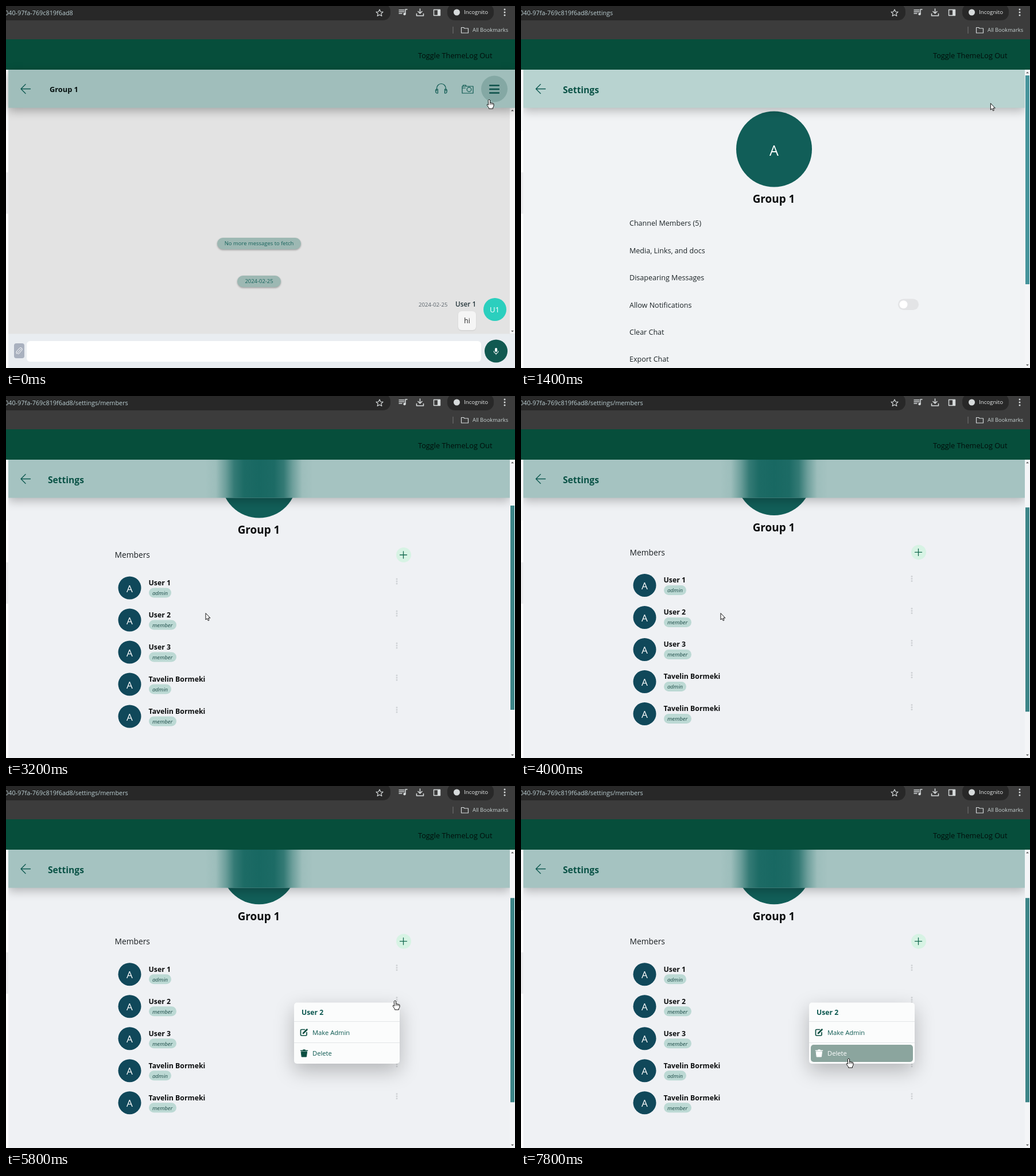
These frames come from a looping animation (887 px wide and 631 px high, 8 s). An HTML page with a canvas:

```html
<!DOCTYPE html>
<html lang="en">
<head>
<meta charset="utf-8">
<title>Group chat settings</title>
<style>
html, body { margin: 0; width: 100%; height: 100%; overflow: hidden; background: #e3e3e3; }
canvas { display: block; }
</style>
</head>
<body>
<canvas id="stage" width="887" height="631"></canvas>
<script>
const W = 887, H = 631, LOOP = 8000, STEP = 200;
const main = document.getElementById('stage').getContext('2d');
const layerCanvas = Object.assign(document.createElement('canvas'), { width: W, height: H });
const layer = layerCanvas.getContext('2d');
let g = main;

const DARK = '#0c5850';
const MENU = ['Channel Members (5)', 'Media, Links, and docs', 'Disapearing Messages',
  'Allow Notifications', 'Clear Chat', 'Export Chat'];
const MEMBERS = [['User 1', 'admin'], ['User 2', 'member'], ['User 3', 'member'],
  ['Tavelin Bormeki', 'admin'], ['Tavelin Bormeki', 'member']];

// Tracks: [time, ...values]
const POINTER = [[0, 842, 163], [600, 860, 143], [800, 861, 142], [1000, 861, 142],
  [1600, 797, 184], [1800, 797, 184], [2000, 404, 360], [2200, 404, 360], [2400, 362, 377],
  [2600, 348, 379], [4600, 348, 379], [5400, 678, 374], [5800, 678, 374], [6400, 590, 422],
  [7000, 578, 430], [7800, 571, 475]];
const SCROLL = [[2800, 0], [3000, 78], [3200, 103], [4000, 107.6], [4400, 109.3]];

function track(keys, t) {
  if (t <= keys[0][0]) return keys[0].slice(1);
  const i = keys.findIndex(k => k[0] > t);
  if (i < 0) return keys[keys.length - 1].slice(1);
  const a = keys[i - 1], b = keys[i], k = (t - a[0]) / (b[0] - a[0]);
  return a.slice(1).map((v, n) => v + (b[n + 1] - v) * k);
}

function rect(x, y, w, h, fill, r = 0) {
  g.fillStyle = fill;
  g.beginPath();
  g.roundRect(x, y, w, h, r);
  g.fill();
}

function disc(x, y, r, fill) {
  g.fillStyle = fill;
  g.beginPath();
  g.arc(x, y, r, 0, 7);
  g.fill();
}

function path(d, x, y, stroke, width = 1.3, fill) {
  const p = new Path2D(d);
  g.save();
  g.translate(x, y);
  g.lineJoin = g.lineCap = 'round';
  if (fill) { g.fillStyle = fill; g.fill(p); }
  if (stroke) { g.strokeStyle = stroke; g.lineWidth = width; g.stroke(p); }
  g.restore();
}

// y is the middle of the capitals
function text(s, x, y, size, color, style = '', align = 'left') {
  g.font = `${style} ${size}px "Open Sans", "Noto Sans", sans-serif`;
  g.textAlign = align;
  g.fillStyle = color;
  g.fillText(s, x, y + size * 0.357);
}

function shadowed(blur, dy, alpha, draw) {
  g.save();
  g.shadowColor = `rgba(0,0,0,${alpha})`;
  g.shadowBlur = blur;
  g.shadowOffsetY = dy;
  draw();
  g.restore();
}

function clipped(x, y, w, h, draw) {
  g.save();
  g.beginPath();
  g.rect(x, y, w, h);
  g.clip();
  draw();
  g.restore();
}

function browser(t) {
  rect(0, 0, W, 58, '#3c3c3c');
  rect(-20, -4, 690, 29, '#282828', 13);
  const tail = t < 800 ? '' : t < 3000 ? '/settings' : '/settings/members';
  text('040-97fa-769c819f6ad8' + tail, -2, 12, 10.85, '#bccfd3');
  const ink = '#d6dadb';
  path('M0-6 1.8-2 6-1.6 2.8 1.2 3.8 5.4 0 3.2-3.8 5.4-2.8 1.2-6-1.6-1.8-2Z', 651, 12, ink, 1.2);
  path('M-7-4H2M-7-1H2M-7 2H-2M4 3V-5H7', 692, 11, ink, 1.5);
  disc(694.5, 14, 2.2, ink);
  path('M0-6V2M-3.5-1.5 0 2 3.5-1.5M-6 2.5V6H6V2.5', 721.5, 11, ink, 1.6);
  path('M-5.5-5H5.5V5H-5.5Z', 751, 11.5, ink, 1.4);
  rect(752, 6.5, 5, 10, ink);
  rect(769, -4, 81, 29, '#282828', 13);
  disc(785.5, 11, 5.5, ink);
  text('Incognito', 798, 11, 9.7, '#e8eaea');
  [6, 11, 16].forEach(y => disc(869, y, 1.5, ink));
  rect(778.5, 36, 1, 12, '#777');
  path('M-6-4.5H-2L-.5-3H6V5H-6Z', 799.5, 42, ink, 1.2);
  text('All Bookmarks', 813, 42, 9.3, '#c9d3d3');
  rect(0, 58, W, 53, '#064e3b');
  text('Toggle ThemeLog Out', 718, 86, 12.75, '#020d0a');
}

function sideStrip() {
  rect(0, 111, 4, H - 111, '#fdfdfd');
  rect(0, 111, 4, 106, '#f6f7f8');
  rect(0, 290, 4, 72, '#ececee');
}

function scrollArrows(top, bottom) {
  path('M-2.5 1.3 0-1.3 2.5 1.3Z', 882.5, top, null, 0, '#555');
  path('M-2.5-1.3 0 1.3 2.5-1.3Z', 882.5, bottom, null, 0, '#555');
}

function backArrow() {
  path('M8.5 0H-8M0-8-8 0 0 8', 34, 144.5, DARK, 1.3);
}

function pill(s, x, y, w) {
  shadowed(3, 1.5, 0.3, () => rect(x, y, w, 20, '#9db8b3', 10));
  text(s, x + w / 2, y + 10, 9.45, '#17635c', '', 'center');
}

function chatPage(t) {
  rect(4, 111, 883, 520, '#e3e3e3');
  rect(878, 178, 9, 393, '#f8f8f8');
  scrollArrows(182, 567);
  shadowed(16, 5, 0.28, () => rect(4, 111, 883, 66.5, '#a0bebb'));
  backArrow();
  text('Group 1', 76, 145, 12.8, '#06100f', 'bold');
  path('M-8 4V0a8 8.5 0 0 1 16 0V4M-8 1q-2 0-2 3t2 4h2V1ZM8 1q2 0 2 3t-2 4h-2V1Z', 758.5, 144, DARK, 1.2);
  path('M-9.5-5H9.5V7H-9.5ZM-8-5V-7H-3V-5M-9.5-2H-4', 804.5, 145, DARK, 1.2);
  g.beginPath();
  g.arc(807, 145.5, 3.8, 0, 7);
  g.strokeStyle = DARK;
  g.lineWidth = 1.2;
  g.stroke();
  if (t < 800) disc(851, 144.5, 23, '#84a8a4');
  [138.5, 145, 151.5].forEach(y => rect(842, y - 1.2, 18, 2.4, '#0b4f48', 1));

  pill('No more messages to fetch', 368, 404, 146);
  pill('2024-02-25', 403, 470, 76);
  text('2024-02-25', 719, 521, 9.7, '#59636a');
  text('User 1', 783, 520, 11.8, '#25363b', '600');
  disc(852, 529, 20, '#2bcfbe');
  text('U1', 851.5, 529.5, 13.2, '#fff', '', 'center');
  shadowed(2, 1, 0.1, () => rect(788, 532, 31, 33, '#f5f5f5', 6));
  text('hi', 803.5, 549, 12, '#222', '', 'center');

  rect(4, 571.5, 883, 60, '#e9edf1');
  rect(14, 588, 18, 26, '#a9b1bf', 4);
  path('M3.5-3-2 3.2a1.3 1.3 0 0 0 2 1.8L5-1a2.6 2.6 0 0 0-4-3.5L-4 1a4 4 0 0 0 0 4', 22.5, 601, '#fff', 1);
  rect(36, 584, 792, 36, '#fff', 6);
  disc(854, 601.5, 20, '#115951');
  rect(852, 596, 4, 7, '#fff', 2);
  path('M-3.8 0a3.8 4 0 0 0 7.6 0M0 4V6', 854, 601.5, '#fff', 1.1);
}

function settingsHeader(scroll, members) {
  const base = members ? '#a5c3c1' : '#b8d3d0';
  shadowed(16, 5, 0.25, () => rect(4, 111, 874, 66.5, base));
  const cover = Math.min(1, Math.max(0, (scroll - 6) / 60));
  if (cover) {
    const blur = g.createLinearGradient(347, 0, 535, 0);
    [[0, 0], [0.1, 0.06], [0.19, 0.4], [0.27, 0.8], [0.36, 0.97], [0.5, 1]].forEach(([p, a]) => {
      const c = `rgba(24,104,98,${a * cover})`;
      blur.addColorStop(p, c);
      blur.addColorStop(1 - p, c);
    });
    rect(347, 111, 188, 66.5, blur);
  }
  backArrow();
  text('Settings', 73, 146, 15.6, '#0a5246', 'bold');
}

function menuList() {
  MENU.forEach((s, i) => text(s, 189, 379 + i * 47.4, 12.55, '#1c2427'));
  rect(657, 510.5, 36, 19.5, '#e3e4e6', 10);
  disc(666.5, 520.2, 7, '#fff');
}

function memberList() {
  text('Members', 189.5, 380.5, 13.8, '#1a1f22');
  disc(693, 380, 13, '#d7f3e4');
  path('M-6 0H6M0-6V6', 692.5, 380, '#14694f', 1.3);
  MEMBERS.forEach(([name, role], i) => {
    const y = 437.5 + i * 56;
    disc(215.5, y, 20, '#10485a');
    text('A', 215.5, y + 1, 17, '#fff', '', 'center');
    text(name, 248.5, y - 9, 12.3, '#0b0d0e', 'bold');
    rect(249, y, role === 'admin' ? 39 : 48, 17, '#bcd9d4', 8.5);
    text(role, 255, y + 9, 9.5, '#1d4c48', 'italic');
    [-4, 0, 4].forEach(d => disc(681, y - 11.5 + d, 1.5, '#cfd2d5'));
  });
}

function settingsPage(scroll, members) {
  rect(4, 111, 883, 520, members ? '#eff1f4' : '#f1f3f5');
  clipped(4, 111, 874, 520, () => {
    g.translate(0, -scroll);
    disc(441, 249.5, 66, '#115e58');
    text('A', 441, 252, 25, '#fff', '', 'center');
    text('Group 1', 440.5, 336.5, 18.9, '#0a0c0d', 'bold', 'center');
    members ? memberList() : menuList();
  });
  clipped(4, 111, 874, 100, () => settingsHeader(scroll, members));
  rect(878, 111, 9, 520, '#f4f5f7');
  scrollArrows(116, 626);
  rect(879, 121 + scroll * 0.68, 7, members ? 356 : 364, members ? '#3c8588' : '#45949b');
}

function menuItem(label, y, icon, hot) {
  if (hot) rect(505, y - 15, 178, 30, '#8ba59e', 5);
  const ink = hot ? '#fff' : '#0a4d40';
  icon(ink, y);
  text(label, 534, y + 0.5, 11.2, hot ? '#fff' : DARK);
}

function editIcon(ink, y) {
  path('M1-5H-4.5Q-6-5-6-3.5V4Q-6 5.5-4.5 5.5H3Q4.5 5.5 4.5 4V0', 519.5, y, ink, 1.7);
  path('M-1.5 1.5 5-5', 519.5, y, ink, 2.6);
}

function trashIcon(ink, y) {
  path('M-5-3H5L4 6H-4Z', 519.5, y, ink, 1, ink);
  path('M-6-4.8H6M-1.5-6H1.5', 519.5, y, ink, 1.6);
}

function popup(py, t) {
  const pick = t >= 6200;
  shadowed(34, 12, 0.25, () => rect(502, 377.5, 184, 106.5, '#fbfcfc', 5));
  text('User 2', 515, 395, 12.2, DARK, 'bold');
  rect(502, 410, 184, 1, '#e2e5e7');
  rect(502, 447, 184, 1, '#e2e5e7');
  menuItem('Make Admin', 429.5, editIcon, pick && py > 414 && py < 447);
  menuItem('Delete', 466, trashIcon, pick && py >= 447);
}

function pointer(x, y, hand) {
  const d = hand
    ? 'M-1.5 1Q0-1 1.5 1V6Q3 5 4 6.2 5.5 5.3 6.2 6.8 7.6 6.3 8 7.8V11Q7.5 13 6.5 14V16H-.5V14.5L-3.5 10.5Q-4.3 8.2-2.6 8.4L-1.5 9.6Z'
    : 'M0 0V11L2.5 8.8 4.2 12.6 6 11.8 4.3 8H7.6Z';
  path(d, x, y, '#111', 1, '#fff');
  if (hand) path('M1.5 6V9M4 6.5V9M6.2 7V9', x, y, '#111', 0.8);
}

function blend(alpha, draw) {
  g = layer;
  g.clearRect(0, 0, W, H);
  draw();
  g = main;
  g.globalAlpha = alpha;
  g.drawImage(layerCanvas, 0, 0);
  g.globalAlpha = 1;
}

function render(t) {
  const [x, y] = track(POINTER, t), [scroll] = track(SCROLL, t);
  browser(t);
  sideStrip();
  if (t < 1200) chatPage(t);
  if (t >= 800 && t < 1200) blend(0.27, () => settingsPage(0, false));
  if (t >= 1200 && t < 3200) settingsPage(scroll, false);
  if (t === 3000) blend(0.5, () => settingsPage(scroll, true));
  if (t >= 3200) settingsPage(scroll, true);
  if (t >= 2400 && t < 3000) {
    rect(-6, 613, 34, 24, '#858585', 3);
    text('mbers', -7, 622.5, 9.6, '#e6e6e6');
  }
  if (t === 5600) blend(0.5, () => popup(y, t));
  if (t >= 5800) popup(y, t);
  const hand = t < 800 || (t >= 2400 && t < 3000) || (t >= 5400 && t <= 5800) || t >= 6400;
  pointer(x, y, hand);
}

const start = performance.now();
function tick() {
  const t = (performance.now() - start) % LOOP;
  render(Math.floor(t / STEP) * STEP);
  requestAnimationFrame(tick);
}
tick();
</script>
</body>
</html>
```
